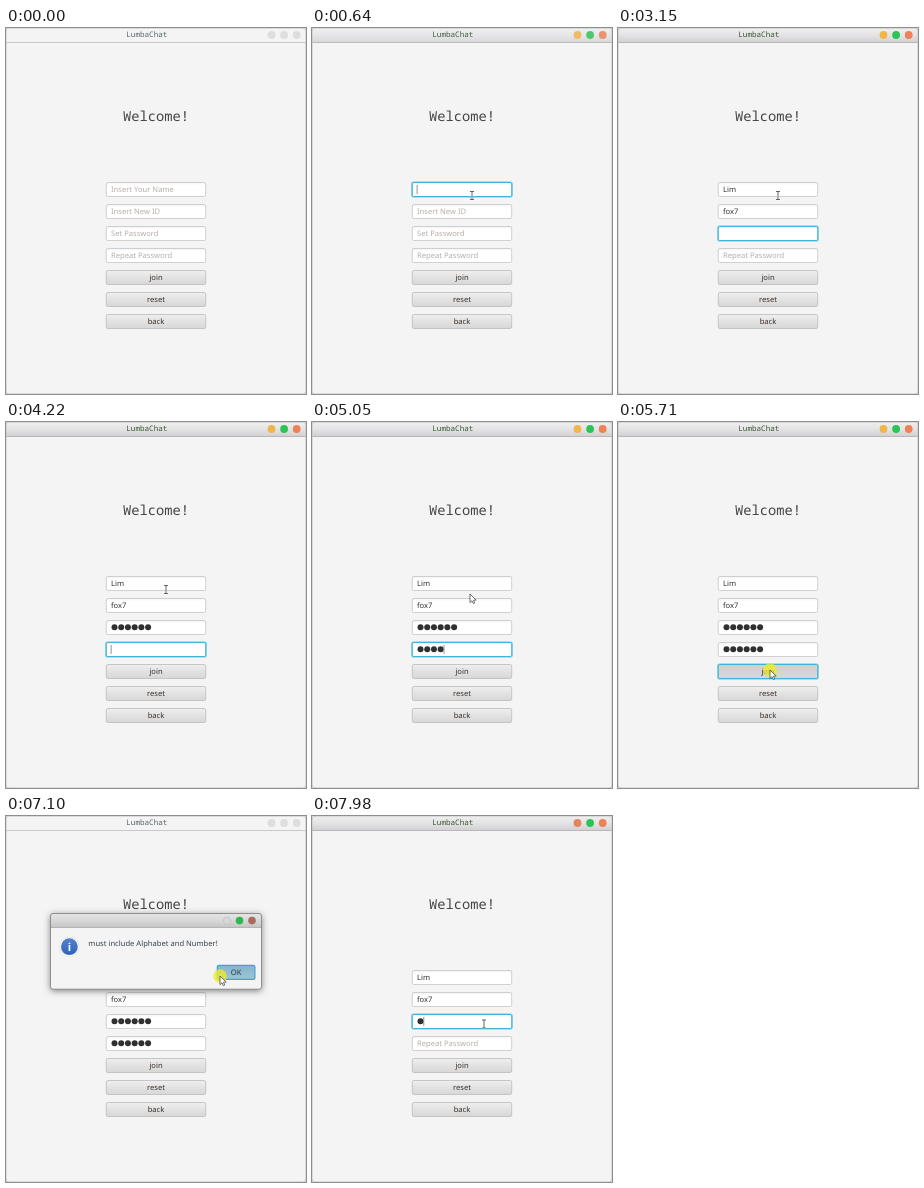
Write an HTML page with a canvas that moves like this. It is 300x366 px and loops after 8 s.

```html
<!DOCTYPE html>
<html lang="en">
<head>
<meta charset="utf-8">
<title>Sign up</title>
<style>
  html, body { margin: 0; width: 100%; height: 100%; overflow: hidden; background: #f4f4f4; }
  canvas { display: block; width: 300px; height: 366px; }
</style>
</head>
<body>
<canvas id="stage"></canvas>
<script>
const W = 300, H = 366, LOOP = 8000;
const canvas = document.getElementById('stage');
const dpr = window.devicePixelRatio || 1;
canvas.width = W * dpr;
canvas.height = H * dpr;
const c = canvas.getContext('2d');
const SANS = '"Noto Sans", "Open Sans", sans-serif';
const MONO = '"Noto Sans Mono", "DejaVu Sans Mono", monospace';

const NAME = 'Lim', ID = 'fox7';
const PROMPTS = ['Insert Your Name', 'Insert New ID', 'Set Password', 'Repeat Password'];
const FIELD_Y = [161.5, 183.5, 205.5, 227.5];
const BUTTONS = [['join', 249.5], ['reset', 271.5], ['back', 293.5]];
const JOIN = 4;

// Key press times per field
const KEYS = [
  [930, 1240, 1370],
  [1740, 1990, 2070, 2530],
  [3350, 3430, 3510, 3760, 3830, 3890],
  [4530, 4630, 4780, 4950, 5130, 5240]
];
const CLEARED = 7330, RETYPE = 7980;
// [time, focused control]
const FOCUS = [[480, 0], [1510, 1], [2690, 2], [4220, 3], [5700, JOIN], [7760, 2]];
// [time, x, y] of the pointer
const PATH = [
  [30, 186, 366], [400, 160, 167.5], [4930, 160, 167.5], [5050, 158, 172],
  [5560, 152, 248], [5840, 152, 248], [5990, 157, 229], [6160, 158, 228],
  [6560, 211, 162], [6610, 211, 162], [6750, 214, 160], [7300, 214, 160],
  [7680, 172, 208], [8000, 172, 208]
];
const CLICKS = [[460, 640], [5690, 5840], [7100, 7290], [7740, 7830]];

const clamp = v => Math.max(0, Math.min(1, v));
const ramp = (t, a, b) => clamp((t - a) / (b - a));
const ease = p => p * p * (3 - 2 * p);
const within = (t, [a, b]) => t >= a && t < b;

function mix(a, b, p) {
  const part = (s, i) => parseInt(s.slice(1 + i * 2, 3 + i * 2), 16);
  const v = [0, 1, 2].map(i => Math.round(part(a, i) + (part(b, i) - part(a, i)) * p));
  return `rgb(${v})`;
}

function gradient(y0, y1, ...stops) {
  const g = c.createLinearGradient(0, y0, 0, y1);
  stops.forEach((s, i) => g.addColorStop(i / (stops.length - 1), s));
  return g;
}

function box(x, y, w, h, r, fill, stroke, width = 1) {
  c.beginPath();
  c.roundRect(x, y, w, h, r);
  if (fill) { c.fillStyle = fill; c.fill(); }
  if (stroke) { c.strokeStyle = stroke; c.lineWidth = width; c.stroke(); }
}

function dot(x, y, r, fill) {
  c.beginPath();
  c.arc(x, y, r, 0, Math.PI * 2);
  c.fillStyle = fill;
  c.fill();
}

function text(s, x, y, color, font, align = 'left') {
  c.font = font;
  c.textAlign = align;
  c.fillStyle = color;
  c.fillText(s, x, y);
}

const label = (s, x, y, color, align) => text(s, x, y, color, '7.6px ' + SANS, align);

function pointerAt(t) {
  const i = PATH.findIndex((p, n) => n && t < p[0]);
  const [t0, x0, y0] = PATH[i - 1], [t1, x1, y1] = PATH[i];
  const p = ease(ramp(t, t0, t1));
  return [x0 + (x1 - x0) * p, y0 + (y1 - y0) * p];
}

function focusAt(t) {
  return FOCUS.filter(f => t >= f[0]).pop() || [0, -1];
}

function typed(i, t) {
  if (i > 1 && t >= CLEARED) return i === 2 && t >= RETYPE ? 1 : 0;
  return KEYS[i].filter(k => t >= k).length;
}

function caretOn(i, t, since) {
  const last = Math.max(since, ...[...KEYS[i], RETYPE].filter(k => k <= t));
  return (t - last) % 960 < 460;
}

function drawWindow(active, late) {
  c.fillStyle = '#f4f4f4';
  c.fillRect(0, 0, W, H);
  c.globalAlpha = active;
  c.fillStyle = gradient(0, 14, '#f0f0f0', '#e4e3e5', '#d3d1d4');
  c.fillRect(0, 0, W, 14);
  c.globalAlpha = 1;
  c.fillStyle = mix('#c9c9c9', '#b9b7ba', active);
  c.fillRect(0, 14, W, 1);
  box(0, 0, W, H, 3, null, '#c4c4c4');
  text('LumbaChat', 120.3, 9.2, mix('#58666b', '#3d5836', active), '7.6px ' + MONO);
  [late ? '#e5835d' : '#f0b64a', '#2dc457', '#ee8155'].forEach((col, i) =>
    dot(265.5 + i * 12.6, 7, 3.9, mix('#dedede', col, active)));
  text('Welcome!', 150, 92.6, '#444444', '13.75px ' + MONO, 'center');
}

function drawFocus(y) {
  box(99.8, y - 7.4, 100.4, 14.8, 2, null, '#9ad8ec', 1.6);
  box(100.2, y - 7, 99.6, 14, 1.5, null, '#35afd6', 0.9);
}

function drawField(i, t, focus, since) {
  const y = FIELD_Y[i], n = typed(i, t), focused = focus === i;
  box(100.3, y - 7, 99.4, 14, 1.5, gradient(y - 7, y - 4, '#f3f3f3', '#ffffff'), '#c6c6c6', 0.8);
  if (focused) drawFocus(y);
  let end = 105;
  if (i < 2) {
    const s = [NAME, ID][i].slice(0, n);
    label(s, 105, y + 2.6, '#333333');
    end += c.measureText(s).width;
  } else {
    for (let k = 0; k < n; k++) dot(108.5 + k * 6.72, y - 0.2, 3, '#303030');
    end += n * 6.72;
  }
  if (!n && !focused) label(PROMPTS[i], 105, y + 2.6, '#b5aeaa');
  if (focused && caretOn(i, t, since)) {
    c.fillStyle = '#777777';
    c.fillRect(end - 0.3, y - 4.5, 0.8, 9);
  }
}

function drawButton([name, y], focused, pressed, hover) {
  const fill = pressed ? gradient(y - 7, y + 7, '#cfcfcf', '#d8d8d8')
    : hover ? gradient(y - 7, y + 7, '#f6f6f6', '#e4e4e4')
    : gradient(y - 7, y + 7, '#efefef', '#e2e2e2', '#d7d7d7');
  box(100.3, y - 7, 99.4, 14, 1.5, fill, '#bcbcbc', 0.8);
  if (focused) drawFocus(y);
  label(name, 150, y + 2.5, '#3a2f28', 'center');
}

function drawDialog(t) {
  const shown = ramp(t, 5850, 6010), gone = ramp(t, 7270, 7420);
  const alpha = shown * (1 - gone);
  if (!alpha) return;
  const active = ramp(t, 5980, 6180);
  const scale = 0.92 + 0.08 * ease(alpha);
  c.save();
  c.globalAlpha = alpha;
  c.translate(150, 135.3);
  c.scale(scale, scale);
  c.translate(-150, -135.3);
  c.save();
  c.shadowColor = 'rgba(0,0,0,.5)';
  c.shadowBlur = 7 * dpr;
  c.shadowOffsetY = 1.5 * dpr;
  box(44.5, 97.5, 211, 75.7, 2.5, '#f4f4f4');
  c.restore();
  box(44.5, 97.5, 211, 14, [2.5, 2.5, 0, 0], gradient(97, 112, '#e6e6e6', '#d8d8d8', '#c3c3c3'));
  c.fillStyle = '#aaaaaa';
  c.fillRect(44.5, 111, 211, 0.8);
  box(44.5, 97.5, 211, 75.7, 2.5, null, '#858585', 0.9);
  dot(221, 104.6, 3.8, '#bcbcbc');
  dot(221, 104.6, 3.3, '#d6d6d6');
  dot(233.5, 104.6, 3.8, mix('#2ecc71', '#2fb851', active));
  dot(246, 104.6, 3.8, mix('#959595', '#ab6a61', active));

  dot(63.4, 130.7, 10, '#d2d6de');
  dot(63.4, 130.7, 9.5, '#ffffff');
  dot(63.4, 130.7, 8.4, gradient(122, 139, '#5583cf', '#2f62b8'));
  text('i', 63.4, 134.6, '#ffffff', 'bold 11px ' + SANS, 'center');
  label('must include Alphabet and Number!', 82.3, 129.6, mix('#4b535c', '#39424c', active));

  const pressed = within(t, CLICKS[2]), hover = t >= 6610;
  const fill = pressed ? gradient(149, 164, '#86b4cc', '#9cc4d8')
    : hover ? gradient(149, 164, '#c4e2ee', '#a4cde0')
    : gradient(149, 164, '#b7d8e7', '#a0c9dc');
  box(211.3, 149.4, 37.6, 14, 1.5, fill, mix('#8ab5c9', '#3ba5ca', active), 1.2);
  label('OK', 230.1, 159, '#2d3c45', 'center');
  c.restore();
}

function drawPointer(t) {
  if (t < 30) return;
  const [x, y] = pointerAt(t);
  if (CLICKS.some(k => within(t, k))) dot(x, y, 6.8, 'rgba(238,234,40,.78)');
  const modal = t > 5840 && t < 7380;
  const beam = !modal && x > 100 && x < 200 && FIELD_Y.some(f => Math.abs(y - f) < 7);
  c.save();
  c.translate(x, y);
  c.beginPath();
  if (beam) {
    c.moveTo(-2, -4); c.lineTo(2, -4);
    c.moveTo(0, -4); c.lineTo(0, 4);
    c.moveTo(-2, 4); c.lineTo(2, 4);
    c.strokeStyle = 'rgba(255,255,255,.8)';
    c.lineWidth = 2;
    c.stroke();
    c.strokeStyle = '#555555';
    c.lineWidth = 0.9;
    c.stroke();
  } else {
    [[0, 0], [0, 8.6], [2, 6.8], [3.4, 9.6], [4.7, 9], [3.5, 6.2], [6.2, 6]].forEach(p => c.lineTo(...p));
    c.closePath();
    c.fillStyle = '#ffffff';
    c.fill();
    c.strokeStyle = '#4a4a4a';
    c.lineWidth = 0.8;
    c.lineJoin = 'round';
    c.stroke();
  }
  c.restore();
}

function draw(t) {
  c.setTransform(dpr, 0, 0, dpr, 0, 0);
  c.textRendering = 'geometricPrecision';
  const active = t < 5000 ? ramp(t, 470, 680)
    : t < 7000 ? 1 - ramp(t, 5840, 5980) : ramp(t, 7330, 7520);
  const [since, wanted] = focusAt(t);
  const focus = active > 0.3 ? wanted : -1;
  const [px, py] = pointerAt(t);
  drawWindow(active, t > 7000);
  FIELD_Y.forEach((_, i) => drawField(i, t, focus, since));
  BUTTONS.forEach((b, i) => {
    const hover = active === 1 && px > 100 && px < 200 && Math.abs(py - b[1]) < 7;
    drawButton(b, focus === JOIN + i, i === 0 && within(t, CLICKS[1]), hover);
  });
  drawDialog(t);
  drawPointer(t);
}

const start = performance.now();
function tick() {
  draw((performance.now() - start) % LOOP);
  requestAnimationFrame(tick);
}
tick();
</script>
</body>
</html>
```
